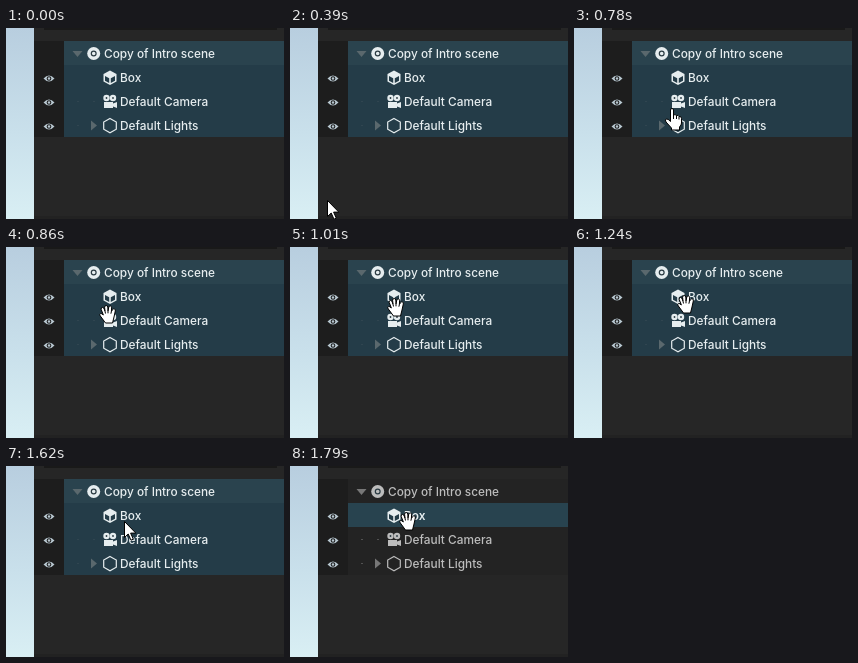
Write an HTML page that moves like this. It is 278 px wide and 191 px high and loops after 2480 ms.

```html
<!DOCTYPE html>
<html lang="en">
<head>
<meta charset="utf-8">
<title>Scene tree</title>
<style>
  html, body { margin: 0; width: 100%; height: 100%; overflow: hidden; background: #262626; }
  svg { display: block; width: 278px; height: 191px; }
  text { font: 500 11.85px Inter, "Open Sans", sans-serif; fill: currentColor; }

  .all, .one, .tree, .muted, .name, .twist, #move, .arrow, .point, .grab {
    animation: 2480ms step-end infinite;
  }

  /* selection */
  .all { animation-name: all; }
  .one { opacity: 0; animation-name: one; }
  .tree { color: #e6edef; }
  .muted { color: #e6edef; animation-name: mute; }
  .name { animation-name: bold; }
  .twist { fill: #5a686d; animation-name: twist; }
  @keyframes all { 0% { opacity: 1; } 72.17%, 100% { opacity: 0; } }
  @keyframes one { 0% { opacity: 0; } 72.17%, 100% { opacity: 1; } }
  @keyframes mute { 0% { color: #e6edef; } 72.17%, 100% { color: #bcbcbc; } }
  @keyframes bold { 0% { font-weight: 500; } 72.17%, 100% { font-weight: 600; } }
  @keyframes twist { 0% { fill: #5a686d; } 72.17%, 100% { fill: #777; } }

  /* pointer */
  .arrow, .point, .grab { opacity: 0; fill: #fff; stroke: #000; stroke-linejoin: round; }
  #move { animation-name: move; }
  .arrow { animation-name: arrow; }
  .point { animation-name: point; }
  .grab { animation-name: grab; }
  @keyframes move {
    0%, 15.72% { transform: translate(37px, 172px); }
    18.95% { transform: translate(52px, 149px); }
    22.17% { transform: translate(65px, 128px); }
    25.4% { transform: translate(77px, 110px); }
    28.22% { transform: translate(82px, 95px); }
    31.45% { transform: translate(91px, 80px); }
    34.67% { transform: translate(93px, 58px); }
    37.5% { transform: translate(95px, 54px); }
    40.72% { transform: translate(97px, 51px); }
    43.95% { transform: translate(99px, 50px); }
    46.77% { transform: translate(101px, 49px); }
    50% { transform: translate(103px, 48px); }
    53.22% { transform: translate(106px, 47px); }
    56.04% { transform: translate(109px, 46px); }
    65.32% { transform: translate(118px, 55px); }
    72.17%, 100% { transform: translate(109px, 46px); }
  }
  @keyframes arrow {
    0%, 28.22%, 72.17%, 100% { opacity: 0; }
    15.72%, 65.32% { opacity: 1; }
  }
  @keyframes point {
    0%, 34.67%, 100% { opacity: 0; }
    28.22% { opacity: 1; }
  }
  @keyframes grab {
    0%, 65.32% { opacity: 0; }
    34.67%, 72.17%, 100% { opacity: 1; }
  }
</style>
</head>
<body>
<svg viewBox="0 0 278 191">
  <defs>
    <linearGradient id="sky" x2="0" y2="1">
      <stop stop-color="#b8cedf"/>
      <stop offset=".55" stop-color="#c9e0eb"/>
      <stop offset="1" stop-color="#d9eff4"/>
    </linearGradient>
    <g id="eye">
      <path d="M-5.5 0Q0-6 5.5 0Q0 6-5.5 0Z" fill="#b8c7d0"/>
      <circle r="2.3" fill="#1d1d1d"/>
      <circle r="1.2" fill="#b8c7d0"/>
    </g>
    <path id="dots" d="M71 73.5h2M87 73.5h2M71 97.5h2" stroke="#999"/>
  </defs>

  <!-- panel -->
  <rect width="28" height="191" fill="url(#sky)"/>
  <rect x="28" width="250" height="191" fill="#262626"/>
  <rect x="38" width="233" height="2" fill="#191919"/>
  <rect x="28" y="188" width="250" height="3" fill="#222"/>
  <rect x="28" y="13" width="30" height="96" fill="#1d1d1d"/>
  <use href="#eye" x="43" y="50.5"/>
  <use href="#eye" x="43" y="74.5"/>
  <use href="#eye" x="43" y="98.5"/>

  <!-- row backgrounds -->
  <g class="all">
    <rect x="58" y="13" width="220" height="96" fill="#243c48"/>
    <rect x="58" y="13" width="220" height="24" fill="#2a434e"/>
    <use href="#dots" opacity=".1"/>
  </g>
  <g class="one">
    <rect x="58" y="13" width="220" height="96" fill="#232323"/>
    <rect x="58" y="37" width="220" height="24" fill="#28434f"/>
    <use href="#dots" opacity=".4"/>
  </g>

  <!-- tree -->
  <g class="tree">
    <path class="twist" d="M66.5 23h10l-5 6z"/>
    <path class="twist" d="M85 92.5v10l6-5z"/>
    <g class="muted">
      <circle cx="87.7" cy="25.5" r="6.5" fill="currentColor"/>
      <circle cx="87.7" cy="25.5" r="2.4" fill="none" stroke="#2a3a42" stroke-width="1.2"/>
      <text x="98" y="30">Copy of Intro scene</text>

      <g fill="currentColor">
        <circle cx="100.5" cy="70" r="3.2"/>
        <circle cx="107" cy="70" r="3.2"/>
        <path d="M98 74h9v1.6l4-1.6v6l-4-1.6v1.6h-9z"/>
      </g>
      <g fill="#2a3a42">
        <circle cx="100.5" cy="70" r=".9"/>
        <circle cx="107" cy="70" r=".9"/>
      </g>
      <text x="114" y="78">Default Camera</text>

      <path d="M104 90.5l6.3 3.6v7.1l-6.3 3.6-6.3-3.6v-7.1z" fill="none" stroke="currentColor" stroke-width="1.2"/>
      <text x="114" y="102">Default Lights</text>
    </g>
    <path d="M104 42.5l6.5 3.5v7.5l-6.5 3.5-6.5-3.5v-7.5z" fill="currentColor"/>
    <path d="M99 48l4.2 2.2v4.9l-4.2-2.3zM109 48l-4.2 2.2v4.9l4.2-2.3z" fill="#243c48"/>
    <text class="name" x="114" y="54">Box</text>
  </g>

  <g id="move">
    <path class="arrow" d="M.5.5V16.5L4.2 13 7 19.2 9.3 18.2 6.6 12.1H11.8Z"/>
    <g class="point">
      <path d="M5.5 2Q5.5.5 7 .5T8.5 2V7Q10.2 6 11.5 7.5Q13.2 6.8 14 8.5Q16.5 8 16.5 10.5V15Q16.5 17 14.5 19V22H6.5V20L1 14Q-.3 11.6 1.2 11Q3 10.5 5.5 13.5Z"/>
      <path d="M8.5 7v4M11.5 7.5v3.5M14 8.5v3" fill="none"/>
    </g>
    <g class="grab">
      <path d="M4 9L2.2 4.5Q1.8 2.6 3.4 2.4Q4.6 2.3 5.2 4L6 6.2 5.6 2.2Q5.6.6 7.1.5Q8.6.5 8.8 2L9 6 9.8 2Q10.2.7 11.5 1Q12.8 1.3 12.6 2.8L12.4 6.5 13.6 4.6Q14.4 3.5 15.6 4Q16.6 4.6 16.3 6L15 12 13.5 18H6.5L1.2 10.8Q.2 9 1.6 8.5Q2.8 8.3 4.3 10Z"/>
      <path d="M6 6.2l.5 2.3M9 6v2.3M12.4 6.5l-.5 2.2" fill="none"/>
    </g>
  </g>
</svg>
</body>
</html>
```
